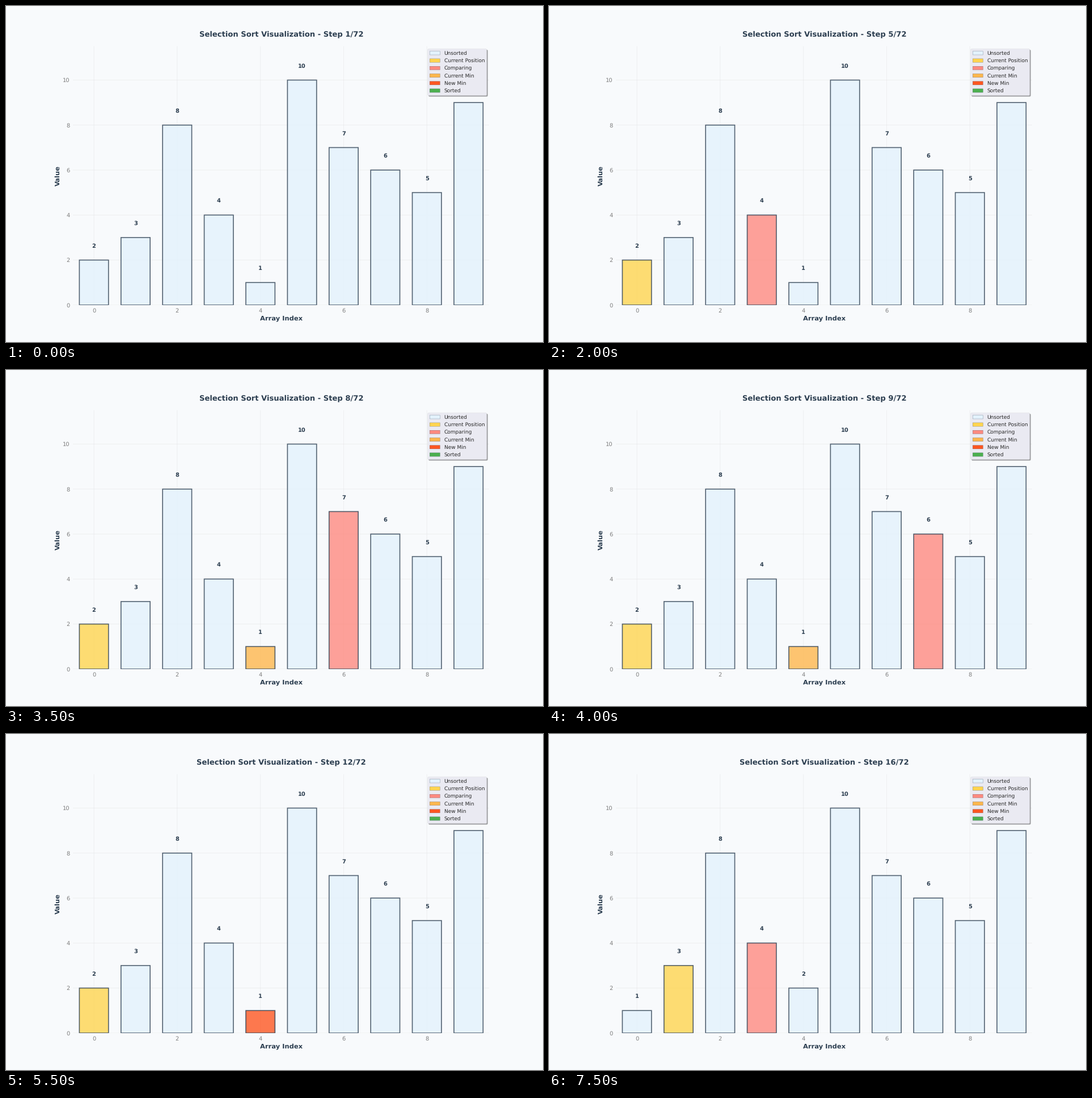
A matplotlib script for the animation above (8 s loop, 947 px wide and 592 px high).

```python
import matplotlib.pyplot as plt
from matplotlib.animation import FuncAnimation
from matplotlib.patches import Patch

DATA = [2, 3, 8, 4, 1, 10, 7, 6, 5, 9]
FRAMES, STEP_MS = 16, 500
BG, INK, GRAY = "#f8fafc", "#2c3e50", "#808080"
COLORS = {
    "Unsorted": "#e3f2fd",
    "Current Position": "#ffd54f",
    "Comparing": "#ff8a80",
    "Current Min": "#ffb74d",
    "New Min": "#ff5722",
    "Sorted": "#4caf50",
}

plt.rcParams.update({
    "font.family": "DejaVu Sans",
    "text.hinting": "none",
    "path.snap": False,
    "patch.linewidth": 0.3,
    "axes.axisbelow": True,
})


def selection_sort(data):
    """Yield (values, {index: role}) for every step of the sort."""
    a, n = list(data), len(data)
    yield a[:], {}
    for i in range(n - 1):
        low = i
        yield a[:], {i: "Current Position"}
        for j in range(i + 1, n):
            yield a[:], {low: "Current Min", i: "Current Position", j: "Comparing"}
            if a[j] < a[low]:
                low = j
        if low != i:
            yield a[:], {i: "Current Position", low: "New Min"}
            a[i], a[low] = a[low], a[i]
        yield a[:], {k: "Sorted" for k in range(i + 1)}
    yield a[:], {k: "Sorted" for k in range(n)}


steps = list(selection_sort(DATA))

fig, ax = plt.subplots(figsize=(15.997, 10), dpi=59.2, facecolor=BG)
ax.set_facecolor(BG)
ax.set_xlim(-0.5, len(DATA) - 0.5)
ax.set_ylim(0, max(DATA) * 1.15)
ax.spines[:].set_visible(False)
ax.grid(True, color="#e0e0e0", alpha=0.5, linewidth=1)
ax.tick_params(length=0, pad=7, labelsize=12, labelcolor=GRAY)
ax.set_xticks(range(0, len(DATA), 2))
ax.set_yticks(range(0, 11, 2))
ax.set_xlabel("Array Index", fontsize=14, fontweight="bold", color=INK)
ax.set_ylabel("Value", fontsize=14, fontweight="bold", color=INK)
title = ax.set_title("", fontsize=16, fontweight="bold", color=INK, pad=20)

bars = ax.bar(range(len(DATA)), DATA, width=0.7, edgecolor=INK, linewidth=2, alpha=0.8)
labels = [ax.text(i, 0, "", ha="center", va="bottom", fontsize=12,
                  fontweight="bold", color=INK) for i in range(len(DATA))]

ax.legend(
    handles=[Patch(facecolor=c, edgecolor=INK, label=name) for name, c in COLORS.items()],
    loc="upper right", fontsize=11, labelcolor="#262626", facecolor="#eaeaf2",
    edgecolor="#cccccc", framealpha=1, fancybox=True, shadow=True,
)


def update(frame):
    values, roles = steps[frame]
    title.set_text(f"Selection Sort Visualization - Step {frame + 1}/{len(steps)}")
    for i, (bar, label, value) in enumerate(zip(bars, labels, values)):
        bar.set_height(value)
        bar.set_facecolor(COLORS[roles.get(i, "Unsorted")])
        label.set_text(str(value))
        label.set_y(value + 0.5)
    return [title, *bars, *labels]


anim = FuncAnimation(fig, update, frames=FRAMES, interval=STEP_MS, repeat=True, repeat_delay=0)
plt.show()
```
